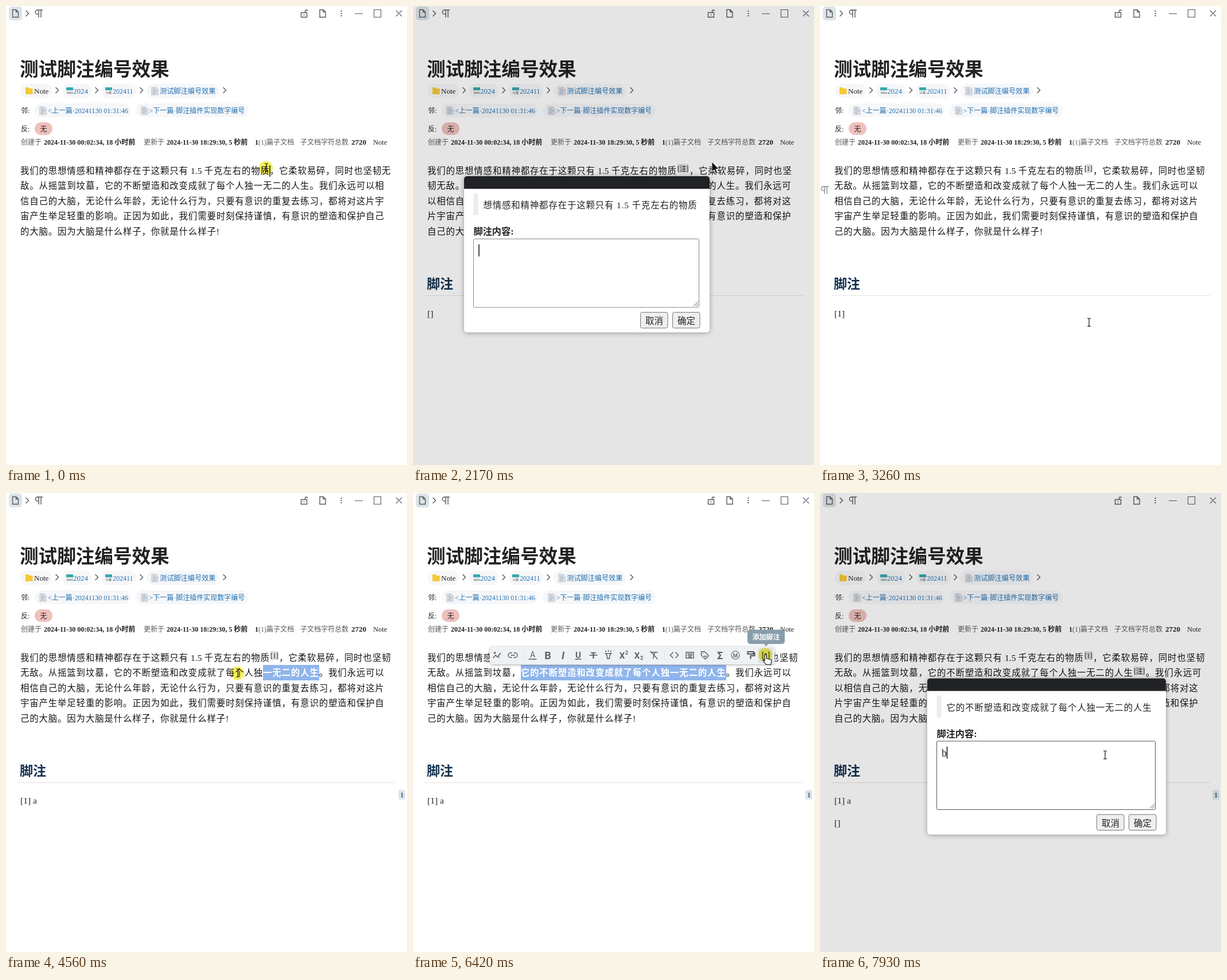
An HTML page that plays this animation: 699x801 px, repeating every 8000 ms.

```html
<!DOCTYPE html>
<html lang="zh-CN">
<head>
<meta charset="utf-8">
<style>
html, body { margin: 0; width: 100%; height: 100%; overflow: hidden; background: #fff; }
svg { display: block; font: 12px "Liberation Serif", "Noto Sans CJK SC", serif; fill: #222; }
text { white-space: pre; }
p { margin: 0; width: 650px; line-height: 26.6px; color: #151517; }
p i { font-style: normal; letter-spacing: .2px; }
p b { background: #8fb5ec; color: #fff; padding: 4.8px 0; }
p sup { font-size: 11.5px; letter-spacing: 0; line-height: 0; vertical-align: baseline; position: relative; top: -5px;
  margin: 0 1.4px; padding: 1.5px 0; background: #dcdcdc; border-radius: 2px; }
.line { fill: none; stroke: #55585c; stroke-width: 1.4; }
.thin { stroke-width: 1.1; }
.chip { fill: #f6f7f9; }
.link { fill: #2270b0; }
.dim { fill: #5a5a5a; }
.body { font-size: 15.4px; font-weight: 500; letter-spacing: .88px; }
.bold { font-weight: bold; }
.tool { font: bold 17px Roboto, sans-serif; fill: #5f6368; text-anchor: middle; }
#bar { filter: drop-shadow(0 1px 2px #0005); }
#dialog { filter: drop-shadow(0 1px 4px #0005); }
#glow { fill: #f6f05c; mix-blend-mode: multiply; }
</style>
</head>
<body>
<svg width="699" height="801" viewBox="0 0 699 801">
  <defs>
    <path id="chevron" class="line" d="M-3-5l5 5-5 5"/>
    <path id="pilcrow" class="line" d="M7-6H-2a3.7 3.7 0 0 0 0 7.4h2M0-6V7M4-6V7"/>
    <path id="file" class="line" d="M-5-6.5h6l4 4v9h-10zM1-6.5v4h4"/>
    <g id="paper">
      <path d="M-5-6h8l3 3v10h-11z" fill="#e3e6ea" stroke="#9aa3ad" stroke-width=".7"/>
      <path d="M-3-3h5M-3-.5h7M-3 2h7M-3 4.5h5" stroke="#7f93a8" stroke-width=".8"/>
    </g>
    <g id="calendar">
      <path d="M-6-6h12v12h-12z" fill="#e8ecee"/>
      <path d="M-6-6h12v5h-12z" fill="#35a7ac"/>
    </g>
  </defs>

  <rect x="5" y="1" width="23" height="24" rx="5" fill="#dde4e8"/>
  <use href="#file" x="16.5" y="13"/>
  <use href="#chevron" x="37.5" y="13"/>
  <use href="#pilcrow" x="57" y="13"/>
  <use href="#file" x="552" y="13"/>
  <path class="line" d="M514.5 11.5h10v8h-10zM519.5 14.5v2M521.500 11V9a2 2 0 0 1 4 0"/>
  <path class="line thin" d="M608 13.5h14M641.5 6.5h12v13h-12zM680 8l10 10M690 8l-10 10"/>
  <path class="line" d="M583.5 9h2M583.5 13h2M583.5 17h2" style="stroke-width:2"/>

  <text x="24" y="122" class="bold" font-size="32.6">测试脚注编号效果</text>

  <g class="chip">
    <rect x="26" y="135.5" width="54" height="25" rx="12"/>
    <rect x="98" y="135.5" width="51" height="25" rx="12"/>
    <rect x="167" y="135.5" width="60" height="25" rx="12"/>
    <rect x="245" y="135.5" width="126" height="25" rx="12"/>
    <rect x="50" y="170" width="167" height="24" rx="12"/>
    <rect x="226" y="170" width="197" height="24" rx="12"/>
  </g>
  <path d="M34 142h5l1.5 2h6v10h-12.500z" fill="#f6c833"/>
  <use href="#calendar" x="111" y="148"/>
  <use href="#calendar" x="179" y="148"/>
  <g font-size="5" text-anchor="middle"><text x="111" y="153">2024</text><text x="179" y="153">11月</text></g>
  <use href="#paper" x="259" y="148"/>
  <use href="#paper" x="64" y="182"/>
  <use href="#paper" x="241" y="182"/>
  <use href="#chevron" x="89.5" y="147"/>
  <use href="#chevron" x="158.5" y="147"/>
  <use href="#chevron" x="236.5" y="147"/>
  <use href="#chevron" x="381.5" y="147"/>
  <text x="49" y="152.5" font-size="13">Note</text>
  <g class="link">
    <text x="117" y="152.5" font-size="13">2024</text>
    <text x="186" y="152.5">202411</text>
    <text x="268" y="152.5" font-size="12.2">测试脚注编号效果</text>
    <text x="73" y="186.5">&lt;上一篇·20241130 01:31:46</text>
    <text x="249.5" y="186.5">&gt;下一篇·脚注插件实现数字编号</text>
  </g>
  <text x="26" y="186.5">邻:</text>
  <text x="26" y="218.5">反:</text>
  <rect x="50" y="203" width="31" height="22" rx="11" fill="#efc0bc"/>
  <text x="59.5" y="218.5">无</text>
  <g class="dim">
    <text x="26" y="241.5">创建于</text>
    <text x="240" y="241.5">更新于</text>
    <text x="440" y="241.5">(1)篇子文档</text>
    <text x="513" y="241.5">子文档字符总数</text>
  </g>
  <g class="bold">
    <text x="66" y="241.5">2024-11-30 00:02:34, 18 小时前</text>
    <text x="280" y="241.5">2024-11-30 18:29:30, 5 秒前</text>
    <text x="434" y="241.5">1</text>
    <text x="602" y="241.5" font-size="13">2720</text>
  </g>
  <text x="640" y="241.5" font-size="12.5">Note</text>

  <foreignObject x="25" y="274.7" width="660" height="150"><p id="para" class="body"></p></foreignObject>
  <path id="caret" d="M460 278v20" stroke="#111" stroke-width="1.5"/>
  <use id="gutter" href="#pilcrow" x="8" opacity=".7"/>

  <g id="notes">
    <text x="24" y="492.5" class="bold" font-size="23" fill="#12304f">脚注</text>
    <path d="M20 505.5h660" stroke="#e2e2e2"/>
    <text id="note1" x="25" y="542" font-size="15.5"></text>
    <text id="note2" x="25" y="581" font-size="15.5"></text>
    <g id="badge">
      <rect x="684" y="518" width="12" height="17" rx="3" fill="#dfe6eb"/>
      <text x="687" y="531" class="bold" font-size="13" fill="#38688f">1</text>
    </g>
  </g>

  <g id="bar">
    <rect width="497" height="31" rx="6" fill="#eff1f3"/>
    <rect id="hover" x="468.5" y="2" width="26" height="27" rx="4" fill="#dfe2e5"/>
    <path d="M61 7v17M305 7v17" stroke="#e1e3e6"/>
    <g class="tool">
      <text x="75" y="19" font-size="14" font-weight="normal">A</text>
      <text x="101.5" y="21.5" font-size="18">B</text>
      <text x="128" y="21.5" font-size="18" font-style="italic">I</text>
      <text x="154.5" y="20" font-size="15">U</text>
      <text x="181" y="21" font-size="15">T</text>
      <text x="231" y="21" font-size="15">X</text><text x="239" y="14" style="font-size:9px">2</text>
      <text x="257" y="21" font-size="15">X</text><text x="265" y="23" style="font-size:9px">2</text>
      <text x="401.5" y="21.5" font-size="18">Σ</text>
      <text x="428.5" y="18.5" style="font-size:9px">M</text>
      <text x="481.5" y="19.5" style="font-size:13px">[1]</text>
    </g>
    <path class="line" d="M6 20l4.5-5 3 3 6-7M9 9v4M7 11h4M16 17v3
      M39 11h-2.5a4 4 0 0 0 0 8H39M42 11h2.5a4 4 0 0 1 0 8H42M37 15h7
      M68 22h14M149 22h11M174 15h14M202 12h10l-3 4v5h-4v-5zM207 6v3M202 7l1.5 2M212 7l-1.5 2
      M282 10h11M288 10l-3 11M280 8l13 14M320 10l-5 5 5 5M324 10l5 5-5 5
      M342.5 10h13v10h-13zM345 13h8.5M345 15.5h8.5M346.5 18h5.5
      M369 9h6l7 7-6 6-7-7zM372 12h1M374 16l2 2 2-2"/>
    <circle class="line thin" cx="428.5" cy="15" r="7"/>
    <path class="line" d="M450 9h10v4h-10zM460 11h2v5h-7v6" style="stroke-width:2"/>
  </g>
  <g id="tip">
    <path d="M-32.5-28.5a5 5 0 0 1 5-5h55a5 5 0 0 1 5 5v15a5 5 0 0 1-5 5H4l-4 4-4-4h-23.5a5 5 0 0 1-5-5z" fill="#879eaa"/>
    <text y="-16.5" class="bold" text-anchor="middle" fill="#fff">添加脚注</text>
  </g>

  <g id="modal">
    <rect width="699" height="801" opacity=".1" fill="#000"/>
    <g id="dialog"></g>
  </g>

  <circle id="glow" r="12"/>
  <g id="cursor" stroke-linejoin="round"></g>
</svg>

<script>
const $ = id => document.getElementById(id);
const TEXT = '我们的思想情感和精神都存在于这颗只有 1.5 千克左右的物质，它柔软易碎，同时也坚韧无敌。' +
  '从摇篮到坟墓，它的不断塑造和改变成就了每个人独一无二的人生。我们永远可以相信自己的大脑，' +
  '无论什么年龄，无论什么行为，只要有意识的重复去练习，都将对这片宇宙产生举足轻重的影响。' +
  '正因为如此，我们需要时刻保持谨慎，有意识的塑造和保护自己的大脑。因为大脑是什么样子，你就是什么样子!';
const END1 = TEXT.indexOf('质') + 1, END2 = TEXT.indexOf('人生') + 2;
const START1 = 4, START2 = END2 - 22, PITCH = 16.28;

const BEAM = '<path d="M-3-7h1.5q1.5 0 1.5 1.5v11q0 1.5-1.5 1.5H-3M3-7H1.5Q0-7 0-5.5M0 5.5Q0 7 1.5 7H3" fill="none" stroke="#111" stroke-width="1.2"/>';
const HAND = '<path d="M-2 11V1.5a1.6 1.6 0 0 1 3.2 0V7l7 1.5q2 .5 1.800 2.5l-1.2 6.500H.5l-5-6.5q-.8-2 1-1.800z" fill="#fff" stroke="#111" stroke-width="1.2"/>';
const ARROW = '<path d="M0 0v17.5l4-3.7 3 6.7 2.8-1.2-3-6.6h5.4z" fill="#111" stroke="#fff" stroke-width=".8"/>';

// time, x, y, shape from then on, eased move to the next key
const PATH = [
  [0, 454, 282, BEAM], [70, 454, 282, BEAM, 1], [410, 94, 259, BEAM], [610, 94, 259, BEAM, 1],
  [1000, 519, 265, HAND], [1090, 521, 266, HAND, 1], [1300, 517, 265, HAND], [1830, 521, 272, ARROW],
  [2400, 521, 272, ARROW, 1], [2900, 476, 548, ARROW], [3140, 470, 551, BEAM], [3260, 469, 552, BEAM, 1],
  [4010, 546, 314, BEAM], [4100, 546, 314, BEAM], [4350, 510, 314, BEAM], [4500, 448, 314, BEAM],
  [4560, 405, 314, BEAM], [4770, 237, 315, BEAM], [4950, 200, 315, BEAM], [5250, 187, 315, BEAM],
  [5480, 187, 315, BEAM, 1], [6000, 610, 284, HAND], [6210, 615, 282, HAND], [6700, 615, 282, HAND, 1],
  [7110, 550, 380, ARROW], [7450, 497, 457, BEAM], [8000, 497, 457, BEAM]
];
const PRESSES = [[0, 480], [1430, 1560], [2950, 3080], [4080, 5400], [6280, 6520]];

const between = (t, a, b) => t >= a && t < b;
const ramp = (t, a, b) => Math.min(1, Math.max(0, (t - a) / (b - a)));
const show = (id, on) => $(id).style.display = on ? '' : 'none';
const cache = {};
function fill(id, html) {
  if (cache[id] !== html) $(id).innerHTML = cache[id] = html;
}

function pointer(t) {
  const i = Math.max(0, PATH.findLastIndex(k => k[0] <= t));
  const a = PATH[i], b = PATH[i + 1] || a;
  let p = ramp(t, a[0], b[0]);
  if (a[4]) p = p * p * (3 - 2 * p);
  return { x: a[1] + (b[1] - a[1]) * p, y: a[2] + (b[2] - a[2]) * p, shape: a[3] };
}

function paragraph(mark1, mark2, from, to) {
  const inserts = [];
  if (mark1) inserts.push([END1, `<sup>[${mark1}]</sup>`]);
  if (mark2) inserts.push([END2, `<sup>[${mark2}]</sup>`]);
  if (from < to) inserts.push([from, '<b>'], [to, '</b>']);
  inserts.sort((a, b) => b[0] - a[0]);
  let html = TEXT;
  for (const [at, tag] of inserts) html = html.slice(0, at) + tag + html.slice(at);
  return html.replace(' 1.5 ', '<i> 1.5 </i>');
}

function dialog(x, y, w, quote, value, border) {
  const button = (bx, label) =>
    `<rect x="${bx}" y="237.5" width="47.5" height="27.5" rx="3" fill="#efefef" stroke="#777"/>
     <text x="${bx + 24}" y="258" font-size="15.5" text-anchor="middle">${label}</text>`;
  const caretX = value ? 34.5 : 26;
  return `<g transform="translate(${x} ${y})">
    <rect width="${w}" height="272.5" rx="5" fill="#fff"/>
    <path d="M0 22V5a5 5 0 0 1 5-5h${w - 10}a5 5 0 0 1 5 5v17z" fill="#202226"/>
    <rect x="16.5" y="30" width="8" height="38" fill="#ececec"/>
    <text x="33.5" y="56" class="body">${quote}</text>
    <text x="16.5" y="102" class="bold" font-size="16.2">脚注内容:</text>
    <rect x="16.5" y="109.5" width="${w - 35}" height="119.5" rx="2" fill="#fff" stroke="${border}"/>
    <text x="25" y="136" font-size="18">${value}</text>
    <path d="M${caretX} 119v21" stroke="#111" stroke-width="1.5"/>
    <path d="M${w - 28} 227l8-8M${w - 24} 227l4-4" stroke="#555"/>
    ${button(w - 120.5, '取消')}${button(w - 64.5, '确定')}
  </g>`;
}

function render(t) {
  const c = pointer(t);
  $('cursor').setAttribute('transform', `translate(${c.x} ${c.y})`);
  fill('cursor', c.shape);
  $('glow').setAttribute('cx', c.x - 1);
  $('glow').setAttribute('cy', c.y + .5);
  show('glow', PRESSES.some(([a, b]) => between(t, a, b)));

  let from = 0, to = 0;
  if (between(t, 70, 1500)) {
    to = END1;
    from = t > 410 ? START1 : Math.round(START1 + (END1 - START1) * ramp(c.x, 89, 460));
  } else if (between(t, 4100, 7110)) {
    to = END2;
    from = t > 5250 ? START2 : Math.max(START2, END2 - Math.round((546 - pointer(t - 60).x) / PITCH));
  }
  fill('para', paragraph(t < 1500 ? '' : t < 3070 ? '注' : '1', t < 7110 ? '' : '注', from, to));
  show('caret', t < 70);

  const second = t > 3000;
  show('gutter', between(t, 620, 1830) || between(t, 3200, 4080) || between(t, 6900, 7110));
  $('gutter').setAttribute('y', second ? 321 : 288);

  show('notes', t >= 1500);
  fill('note1', t < 1830 ? '' : t < 3070 ? '[]' : t < 3500 ? '[1]' : '[1] a');
  fill('note2', t < 6980 ? '' : '[]');
  show('badge', t >= 3500);

  const [bx, by] = second ? [133.5, 268] : [36, 241];
  const tip = second ? ramp(t, 6050, 6160) : ramp(t, 1010, 1120);
  const barOn = between(t, 620, 1830) || between(t, 5460, 6980);
  show('bar', barOn);
  $('bar').setAttribute('transform', `translate(${bx} ${by})`);
  show('hover', tip > 0);
  show('tip', barOn && tip > 0);
  $('tip').setAttribute('transform', `translate(${bx + 482} ${by + 4}) scale(${.8 + .2 * tip})`);
  $('tip').style.opacity = tip;

  const fade = t > 4000 ? ramp(t, 7110, 7280) : ramp(t, 1830, 2000) - ramp(t, 3140, 3240);
  show('modal', fade > 0);
  $('modal').style.opacity = fade;
  fill('dialog', t < 4000
    ? dialog(89, 297, 428, TEXT.slice(START1, END1), t < 2500 ? '' : 'a', '#888')
    : dialog(187, 323.5, 416, TEXT.slice(START2, END2), t < 7930 ? '' : 'b', t < 7930 ? '#888' : '#555'));
}

function tick() {
  render(performance.now() % 8000);
  requestAnimationFrame(tick);
}
tick();
</script>
</body>
</html>
```
